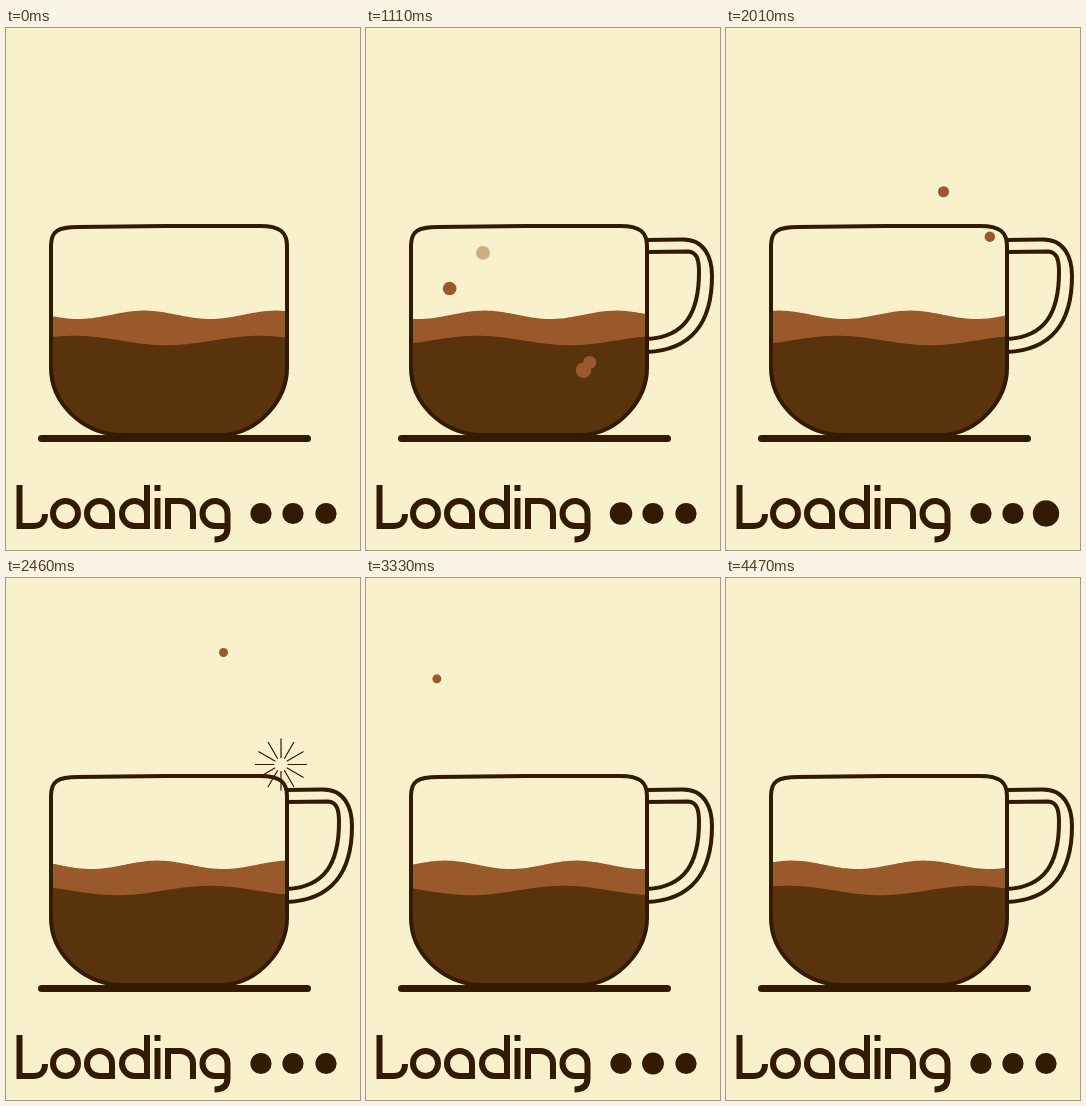
Recreate the animation shown at these times as an HTML page with a canvas. Size 354x522 px, loop 4500 ms.

```html
<!DOCTYPE html>
<html lang="en">
<head>
<meta charset="utf-8">
<title>Loading</title>
<style>
  html, body { margin: 0; width: 100%; height: 100%; overflow: hidden; background: #f9f0cc; }
  canvas { display: block; }
</style>
</head>
<body>
<canvas width="354" height="522" role="img" aria-label="Loading"></canvas>
<script>
const ctx = document.querySelector('canvas').getContext('2d');
const LOOP = 4500, TAU = Math.PI * 2;
const BG = '#f9f0cc', INK = '#331a02', COFFEE = '#59330b', FOAM = '#9a592a';

const cup = new Path2D('M45 218C45 203 52 199 72 199L160 198H254C274 198 281 204 281 218V340C281 371 254 404 218 407H114C74 405 45 373 45 340Z');
const handles = [
  new Path2D('M281 212L316 211.5C339 211 346 230 346 248C346 294 326 322 281 324'),
  new Path2D('M281 224L322 223.5C331 224 333 232 333 244C333 285 319 309 281 311'),
];
const lettering = new Path2D(
  'M13.5 457V498H28C35 498 39 493 39 486' +                  // L
  'M72 485.5a12.5 12.5 0 1 1 -25 0a12.5 12.5 0 1 1 25 0Z' +  // o
  'M106 501V485.5a12.5 12.5 0 1 0 -12.5 12.5H106' +          // a
  'M141 457V498H128.5a12.5 12.5 0 1 1 12.5 -12.5' +          // d
  'M151.5 470V501M151.5 457V463' +                           // i
  'M162 501V473H174.5a12.5 12.5 0 0 1 12.5 12.5V501' +       // n
  'M221.5 485.5a12.5 12.5 0 1 0 -12.5 12.5H221.5V485.5V500C221.5 508 217 511.5 208.5 511.5' // g
);

// Each path point is [time, x, y]; bubbles either pop or fade at the end.
const bubbles = [
  { path: [[30, 112, 388], [630, 97, 311], [1640, 69, 205]], size: [6, 7.2] },
  { path: [[250, 117, 388], [630, 117, 316], [1190, 117, 210]], size: [6, 7] },
  { path: [[760, 215, 388], [1560, 235, 266], [2185, 275, 186.5]], size: [7, 5], pop: true },
  { path: [[880, 217.5, 388], [2650, 217.5, 37]], size: [8.3, 4], pop: true },
  { path: [[2490, 95, 388], [3330, 71, 101], [3445, 53, 79]], size: [6.5, 4.2], pop: true },
];

const clamp = v => Math.max(0, Math.min(1, v));
const mix = (a, b, p) => a + (b - a) * p;

function disc(x, y, r, color) {
  ctx.fillStyle = color;
  ctx.beginPath();
  ctx.arc(x, y, r, 0, TAU);
  ctx.fill();
}

function liquid(level, height, length, crest, color) {
  ctx.fillStyle = color;
  ctx.beginPath();
  ctx.moveTo(40, 415);
  for (let x = 40; x <= 286; x += 2)
    ctx.lineTo(x, level - height * Math.cos((x - crest) / length * TAU));
  ctx.lineTo(286, 415);
  ctx.fill();
}

function drawBubble({ path, size, pop }, t) {
  const start = path[0][0], end = path[path.length - 1][0];
  if (t < start || t >= end) return;
  const next = path.findIndex(point => point[0] > t);
  const [t0, x0, y0] = path[next - 1], [t1, x1, y1] = path[next];
  const p = (t - t0) / (t1 - t0);
  ctx.globalAlpha = pop ? 1 : clamp((end - t) / 180);
  disc(mix(x0, x1, p), mix(y0, y1, p), mix(...size, (t - start) / (end - start)), FOAM);
  ctx.globalAlpha = 1;
}

function drawBurst({ path, pop }, t) {
  const [end, x, y] = path[path.length - 1];
  const p = (t - end) / 500;
  if (!pop || p <= 0 || p >= 1) return;
  const outer = 26 * clamp(p / 0.4), inner = 26 * clamp((p - 0.4) / 0.6);
  ctx.lineWidth = 1.2;
  ctx.beginPath();
  for (let a = 0; a < TAU - 0.1; a += TAU / 12) {
    ctx.moveTo(x + inner * Math.cos(a), y + inner * Math.sin(a));
    ctx.lineTo(x + outer * Math.cos(a), y + outer * Math.sin(a));
  }
  ctx.stroke();
}

function drawHandle(t) {
  const p = clamp(t / 420);
  if (!p) return;
  ctx.lineWidth = 4;
  if (p < 1) ctx.setLineDash([230 * p, 500]);
  handles.forEach(h => ctx.stroke(h));
  ctx.setLineDash([]);
}

function drawDots(t) {
  const cycle = t < 2670 ? 600 : 2670;
  [255, 287, 320].forEach((x, i) => {
    const p = clamp((t - cycle) / 600 - i);
    disc(x, 485.5, 10.6 + 3.2 * Math.sin(Math.PI * p) ** 2, INK);
  });
}

function draw(t) {
  ctx.fillStyle = BG;
  ctx.fillRect(0, 0, 354, 522);
  ctx.strokeStyle = INK;
  ctx.lineCap = 'butt';

  ctx.save();
  ctx.clip(cup);
  liquid(286.8, 4.2, 132, 138 + 132 * t / 600, FOAM);
  liquid(312.5, 4.7, 185, 68 + 185 * t / 900, COFFEE);
  ctx.restore();

  bubbles.forEach(b => drawBubble(b, t));
  drawHandle(t);
  ctx.lineWidth = 4;
  ctx.stroke(cup);
  bubbles.forEach(b => drawBurst(b, t));

  ctx.lineWidth = 6;
  ctx.stroke(lettering);
  drawDots(t);

  ctx.lineCap = 'round';
  ctx.lineWidth = 7;
  ctx.beginPath();
  ctx.moveTo(35.5, 410.5);
  ctx.lineTo(301.5, 410.5);
  ctx.stroke();
}

const begin = performance.now();
function tick() {
  draw((performance.now() - begin) % LOOP);
  requestAnimationFrame(tick);
}
tick();
</script>
</body>
</html>
```
